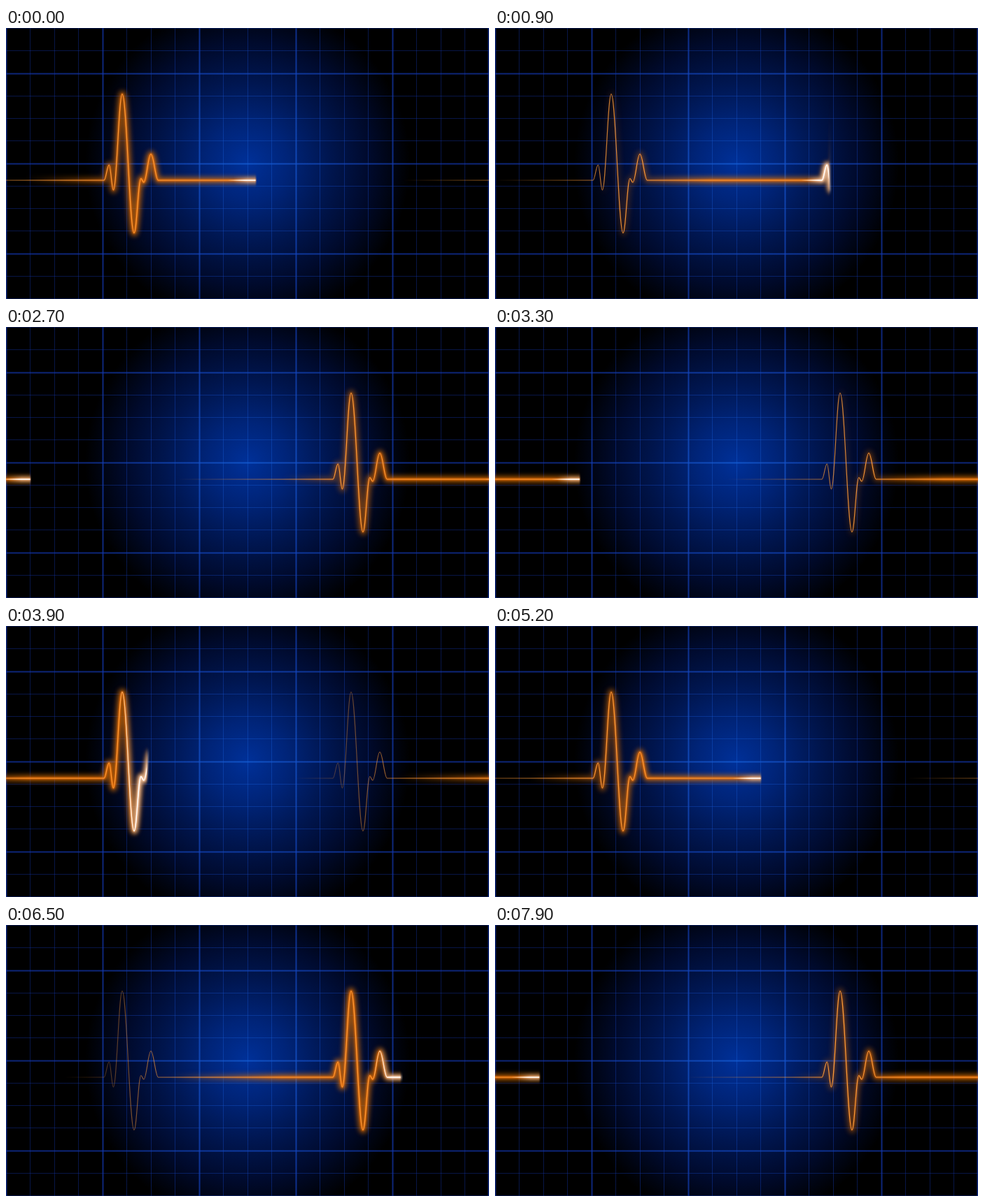
Animation, 690 px wide and 388 px high, one loop 8 s. Source, as an HTML page with a canvas:

```html
<!DOCTYPE html>
<html lang="en">
<head>
<meta charset="utf-8">
<title>Heartbeat monitor</title>
<style>
  html, body { margin: 0; width: 100%; height: 100%; overflow: hidden; background: #000; }
  canvas { display: block; }
</style>
</head>
<body>
<canvas id="stage" width="690" height="388"></canvas>
<script>
const W = 690, H = 388, BASE = 218, LOOP = 8000;
const ctx = document.getElementById('stage').getContext('2d');

function makeLayer(draw) {
  const canvas = document.createElement('canvas');
  canvas.width = W;
  canvas.height = H;
  const g = canvas.getContext('2d');
  if (draw) draw(g);
  return canvas;
}

// Extremes of one beat; the curve is level at each of them.
const BEAT = [[140, BASE], [147.3, 196], [153.4, 232], [166, 94.5], [183, 293.5],
  [192.8, 215.5], [196.8, 221], [207, 180.5], [217.5, BASE]];
const BEAT_STEP = 327;

const trace = new Path2D();
trace.moveTo(-30, BASE);
for (const shift of [0, BEAT_STEP]) {
  trace.lineTo(BEAT[0][0] + shift, BASE);
  for (let i = 1; i < BEAT.length; i++) {
    const [x0, y0] = BEAT[i - 1], [x1, y1] = BEAT[i];
    const bend = (x1 - x0) * 0.38;
    trace.bezierCurveTo(x0 + bend + shift, y0, x1 - bend + shift, y1, x1 + shift, y1);
  }
}
trace.lineTo(W + 30, BASE);

function stroke(g, color, width, blur = 0) {
  g.filter = blur ? `blur(${blur}px)` : 'none';
  g.strokeStyle = color;
  g.lineWidth = width;
  g.lineJoin = 'round';
  g.stroke(trace);
}

function radial(g, radius, ...colors) {
  const fill = g.createRadialGradient(W / 2, H / 2, 0, W / 2, H / 2, radius);
  colors.forEach((color, i) => fill.addColorStop(i / (colors.length - 1), color));
  return fill;
}

const background = makeLayer(g => {
  g.fillStyle = radial(g, 232, '#003098', '#002478', '#001650', '#000a2c', '#000');
  g.fillRect(0, 0, W, H);
  g.fillStyle = radial(g, 260, '#1660d8', '#1448c0', '#1234a8');
  const rule = (major, x, y, w, h) => {
    g.globalAlpha = major ? 0.72 : 0.42;
    g.fillRect(x, y, w, h);
  };
  for (let i = 0; i <= 20; i++) {
    const width = i % 4 ? 1 : 2;
    rule(width > 1, Math.min(W - 1, Math.floor(i * 34.5)) + 0.5 - width / 2, 0, width, H);
  }
  for (let i = 0; i <= 12; i++) {
    const height = i % 4 === 2 ? 2 : 1;
    rule(height > 1, 0, Math.min(H - 1, Math.round(i * 32.26)) + 0.5 - height / 2, W, height);
  }
});

const glow = makeLayer(g => {
  stroke(g, 'rgba(225,115,0,.62)', 10, 3.2);
  stroke(g, 'rgba(255,115,0,.75)', 3.2, 0.8);
});
const line = makeLayer(g => stroke(g, '#ff9c38', 1.2));
const whiteGlow = makeLayer(g => {
  stroke(g, 'rgba(255,225,205,.65)', 8, 2.8);
  stroke(g, 'rgba(255,240,230,.65)', 3, 1);
});
const whiteLine = makeLayer(g => stroke(g, '#fff', 1.4));

const scratch = makeLayer();
const sg = scratch.getContext('2d');

// Shows the part of a layer behind the head: clear at distance `far`, full from `near` on.
function reveal(layer, head, far, near, over = 0, alpha = 1) {
  const span = far + over;
  sg.globalCompositeOperation = 'source-over';
  sg.clearRect(0, 0, W, H);
  for (const x of [head, head + W]) {
    const fade = sg.createLinearGradient(x - far, 0, x + over, 0);
    fade.addColorStop(0, 'rgba(0,0,0,0)');
    fade.addColorStop((far - near) / span, '#000');
    if (over) {
      fade.addColorStop((far - 1) / span, '#000');
      fade.addColorStop(1, 'rgba(0,0,0,0)');
    }
    sg.fillStyle = fade;
    sg.fillRect(x - far, 0, span, H);
  }
  sg.globalCompositeOperation = 'source-in';
  sg.drawImage(layer, 0, 0);
  ctx.globalAlpha = alpha;
  ctx.drawImage(scratch, 0, 0);
  ctx.globalAlpha = 1;
}

// The sweep has 120 steps, sampled ten times a second.
function headAt(t) {
  const tick = Math.floor(t / 100);
  return Math.floor(62 + tick * 2.4 + 1e-6) % 120 * W / 120;
}

function frame(now) {
  const head = headAt(now % LOOP);
  const inBeat = [0, BEAT_STEP].some(s => head > 140 + s && head < 245 + s);
  ctx.drawImage(background, 0, 0);
  reveal(glow, head, 330, 170, 2);
  reveal(line, head, 480, 270);
  reveal(whiteGlow, head, 32, 12, inBeat ? 4 : 2, inBeat ? 0.9 : 0.65);
  reveal(whiteLine, head, 40, 16);
  requestAnimationFrame(frame);
}
requestAnimationFrame(frame);
</script>
</body>
</html>
```
